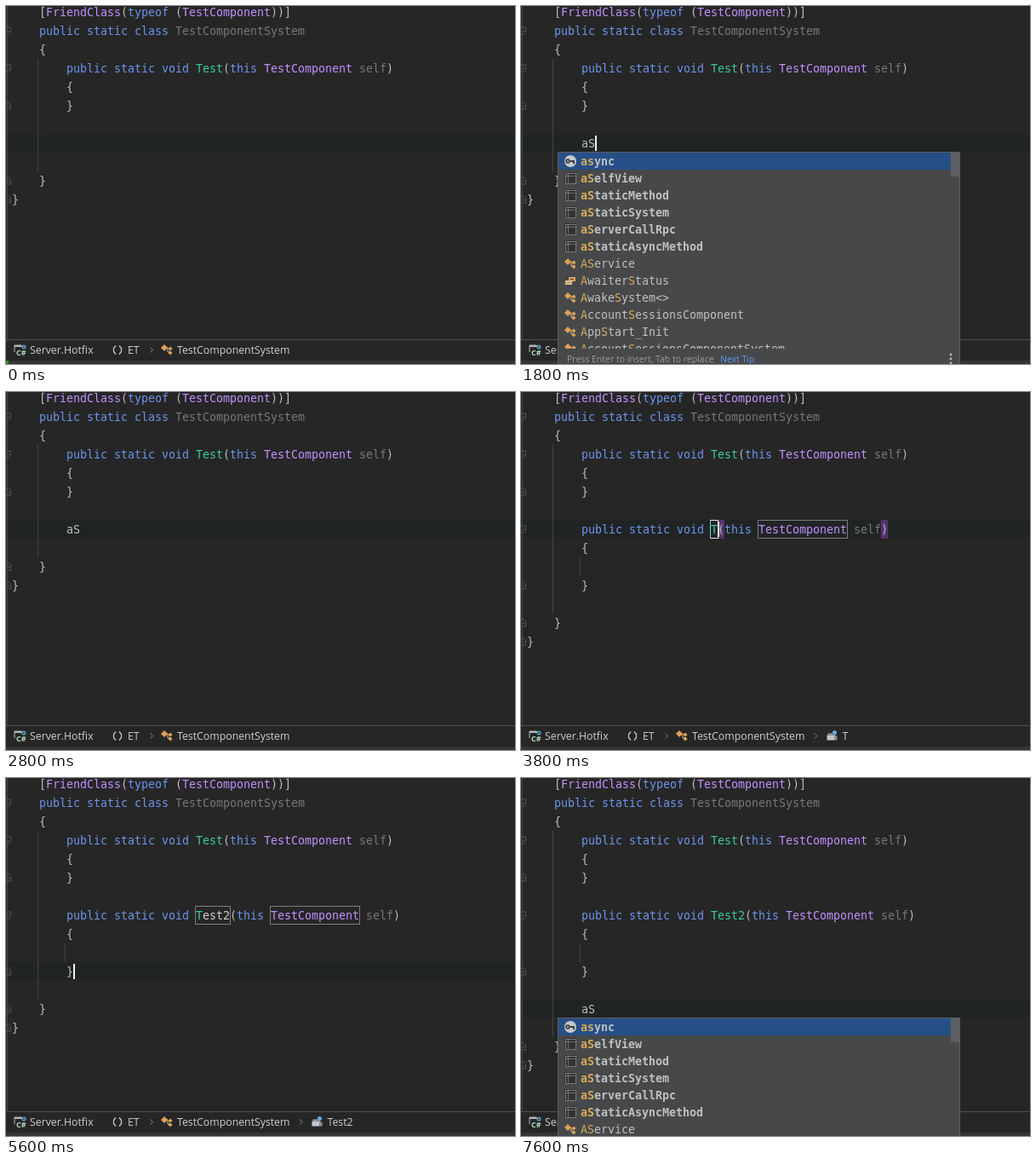
An HTML page with a canvas for the animation above (8 s loop, 598 px wide and 420 px high).

```html
<!DOCTYPE html>
<html lang="en">
<head>
<meta charset="utf-8">
<title>Live template</title>
<style>
html, body { margin: 0; width: 100%; height: 100%; overflow: hidden; background: #262626; }
canvas { display: block; }
</style>
</head>
<body>
<canvas id="stage" width="598" height="420"></canvas>
<script>
const ctx = document.getElementById('stage').getContext('2d');
const LOOP = 8000, ROW = 22, COL = 8, LEFT = 7;
const MONO = '13.3px "DejaVu Sans Mono", monospace';
const UI = '12.3px "Open Sans", sans-serif';
const C = {
  bg: '#262626', line: '#212425', text: '#bdbdbd', key: '#6c95eb', type: '#c191ff',
  fn: '#39cc9b', dim: '#787878', guide: '#434343', ui: '#d0d0d0',
  popup: '#46484a', select: '#274f87', match: '#d6ac5c', orange: '#e0a052', blue: '#6aa7e0'
};
const SUGGEST = [
  ['key', 'async', 1], ['tpl', 'aSelfView', 1], ['tpl', 'aStaticMethod', 1],
  ['tpl', 'aStaticSystem', 1], ['tpl', 'aServerCallRpc', 1], ['tpl', 'aStaticAsyncMethod', 1],
  ['cls', 'AService'], ['enum', 'AwaiterStatus'], ['cls', 'AwakeSystem<>'],
  ['cls', 'AccountSessionsComponent'], ['cls', 'AppStart_Init'],
  ['cls', 'AccountSessionsComponentSystem']
];

// Each step overrides part of the editor state from its time on.
const STEPS = [
  [0, { row: 7, col: 8, caret: false, typed: '', list: false, footer: true, pick: 0, made: false,
        name: '', boxes: false, color: false, crumb: '', param: false, extra: 0, green: true }],
  [600, { caret: true, green: false }],
  [1400, { typed: 'a', col: 9 }],
  [1500, { list: true, footer: false }],
  [1600, { footer: true }],
  [1800, { typed: 'aS', col: 10 }],
  [2300, { pick: 1 }],
  [2400, { pick: 2, caret: false }],
  [2800, { list: false, pick: 0 }],
  [2900, { typed: '', made: true, col: 27, caret: true }],
  [3000, { boxes: true }],
  [3100, { color: true }],
  [3700, { name: 'T', col: 28 }],
  [3800, { crumb: 'T' }],
  [3900, { name: 'Te', col: 29 }],
  [4000, { name: 'Tes', col: 30 }],
  [4100, { name: 'Test', col: 31 }],
  [4400, { param: true }],
  [4600, { name: 'Test2', col: 32 }],
  [5400, { row: 8, col: 9 }],
  [5500, { row: 9, col: 9, param: false }],
  [5600, { row: 10, col: 9, crumb: 'Test2' }],
  [6000, { row: 11, col: 8, extra: 1, boxes: false }],
  [6100, { row: 12, extra: 2 }],
  [6200, { crumb: '' }],
  [6500, { typed: 'a', col: 9 }],
  [6600, { list: true }],
  [6900, { typed: 'aS', col: 10 }],
  [7600, { caret: false }]
];

const stateAt = t => Object.assign({}, ...STEPS.filter(s => s[0] <= t).map(s => s[1]));
const colX = c => LEFT + c * COL;
const rowY = r => r * ROW - 4;

function rect(x, y, w, h, color) {
  ctx.fillStyle = color;
  ctx.fillRect(x, y, w, h);
}

function frame(x, y, w, h, color) {
  ctx.strokeStyle = color;
  ctx.lineWidth = 1;
  ctx.strokeRect(x + .5, y + .5, w - 1, h - 1);
}

function path(points, color, width = 1) {
  ctx.strokeStyle = color;
  ctx.lineWidth = width;
  ctx.beginPath();
  points.forEach(p => ctx.lineTo(p[0], p[1]));
  ctx.stroke();
}

function disc(x, y, r, color) {
  ctx.fillStyle = color;
  ctx.beginPath();
  ctx.arc(x, y, r, 0, 7);
  ctx.fill();
}

function text(str, x, y, color, font) {
  ctx.font = font;
  ctx.fillStyle = color;
  ctx.fillText(str, x, y);
  return x + ctx.measureText(str).width;
}

function code(row, col, ...parts) {
  for (const [str, color] of parts) {
    text(str, colX(col), row * ROW + 12, color, MONO);
    col += str.length;
  }
}

function method(row, name) {
  code(row, 8, ['public static void ', C.key], ...name, ['(', C.text], ['this ', C.key],
    ['TestComponent ', C.type], ['self', C.dim], [')', C.text]);
}

function fold(row, down) {
  const y = row * ROW + 7, d = down ? 1 : -1;
  path([[0, y - 4 * d], [5.5, y - 4 * d], [5.5, y + 2 * d], [2, y + 5 * d], [0, y + 3 * d]], '#545454');
  path([[1, y + .5], [4, y + .5]], '#545454');
}

const ICONS = {
  key(x, y) {
    disc(x, y, 7, '#c4c8ca');
    disc(x - 3, y, 2.8, '#3b3e40');
    disc(x - 3, y, 1, '#c4c8ca');
    rect(x, y - 1, 5, 2, '#3b3e40');
    rect(x + 3, y, 2, 3, '#3b3e40');
  },
  tpl(x, y) {
    rect(x - 7, y - 7, 14, 14, '#303234');
    ctx.setLineDash([1, 1]);
    frame(x - 6, y - 6, 13, 13, '#c2c4c6');
    path([[x - 6, y - 2.5], [x + 6, y - 2.5]], '#a8aaac');
    path([[x - 2.5, y - 6], [x - 2.5, y + 6]], '#a8aaac');
    ctx.setLineDash([]);
  },
  cls(x, y) {
    path([[x - 3, y - 2], [x + 1, y - 2], [x + 1, y + 3], [x + 4, y + 3]], '#c6c6c6');
    for (const [dx, dy, r] of [[-3, -2, 4], [4, -1, 2.6], [4, 4, 2.6]]) {
      ctx.fillStyle = C.orange;
      ctx.beginPath();
      ctx.moveTo(x + dx - r, y + dy);
      ctx.lineTo(x + dx, y + dy - r);
      ctx.lineTo(x + dx + r, y + dy);
      ctx.lineTo(x + dx, y + dy + r);
      ctx.fill();
    }
  },
  enum(x, y) {
    rect(x - 2, y - 4, 8, 5, C.orange);
    rect(x, y - 2, 4, 1, '#4a3c2c');
    rect(x - 6, y, 8, 5, '#c9c9c9');
    rect(x - 5, y + 1, 6, 3, C.orange);
  },
  method(x, y) {
    disc(x + 3, y - 4, 2.5, C.blue);
    path([[x + 3, y - 5], [x + 3, y + 1]], C.blue, 1.5);
    rect(x - 6, y - 1, 9, 6, '#c4c7c9');
    rect(x - 5, y - 3, 6, 2, '#9da1a4');
    rect(x + 3, y, 3, 5, '#8f9497');
  },
  param(x, y) {
    ctx.strokeStyle = C.ui;
    ctx.lineWidth = 1.2;
    for (const a of [0, Math.PI]) {
      ctx.beginPath();
      ctx.arc(x, y, 6.5, a - .8, a + .8);
      ctx.stroke();
    }
    disc(x, y, 2, C.blue);
  },
  space(x, y) {
    for (const d of [-1, 1])
      path([[x + 2 * d, y - 5], [x + 4.5 * d, y - 2], [x + 4.5 * d, y + 2], [x + 2 * d, y + 5]], C.ui, 1.2);
  },
  project(x, y) {
    path([[x - 6, y + 2], [x - 6, y - 6], [x + 2, y - 6]], '#b4b7b9');
    rect(x - 6, y - 6, 9, 2, '#b4b7b9');
    disc(x + 5, y - 4, 2.5, '#5aa7c4');
    disc(x + 5, y - 4, 1, C.bg);
    text('C#', x - 4, y + 6, '#b5d8bd', 'bold 9px "Open Sans", sans-serif');
  }
};

function chevron(x) {
  path([[x - 1.5, 400.5], [x + 1.5, 403.5], [x - 1.5, 406.5]], '#8a8a8a');
}

function crumbs(s) {
  rect(0, 391, 598, 29, C.bg);
  rect(0, 391, 598, 1, '#505050');
  rect(0, 416, 598, 4, '#333536');
  if (s.green) rect(0, 416, 3, 4, '#2f8f2f');
  ICONS.project(16, 404);
  text('Server.Hotfix', 28, 408, C.ui, UI);
  ICONS.space(131, 403.5);
  text('ET', 143, 408, C.ui, UI);
  chevron(171);
  ICONS.cls(189, 403);
  let x = text('TestComponentSystem', 201, 408, C.ui, UI);
  const add = (icon, label) => {
    chevron(x + 13);
    ICONS[icon](x + 32, 403.5);
    x = text(label, x + 44, 408, C.ui, UI);
  };
  if (s.crumb) add('method', s.crumb);
  if (s.param) add('param', 'self');
}

function suggestion([icon, label, bold], y, query) {
  ICONS[icon](58, y + 10);
  const font = (bold ? 'bold ' : '') + MONO;
  const second = query.length < 2 ? -1
    : label === 'async' ? 1 : label.indexOf('S');
  [...label].forEach((ch, i) =>
    text(ch, 70 + i * COL, y + 15, i === 0 || i === second ? C.match : '#bfc1c3', font));
}

function popup(s) {
  const top = rowY(s.row) + ROW - 1;
  rect(43, top, 473, 249, C.popup);
  ctx.save();
  ctx.beginPath();
  ctx.rect(43, top, 473, 231);
  ctx.clip();
  rect(44, top + 1 + s.pick * 20, 471, 20, C.select);
  rect(505, top + 1, 10, 28, '#5d6063');
  SUGGEST.forEach((item, i) => suggestion(item, top + 1 + i * 20, s.typed));
  ctx.restore();
  frame(43, top, 473, 260, '#5c5e60');
  if (!s.footer) return;
  const font = '10.5px "Open Sans", sans-serif';
  text('Press Enter to insert, Tab to replace', 54, top + 247, '#9a9c9e', font);
  text('Next Tip', 234, top + 247, '#589df6', font);
  for (const dy of [238, 243, 248]) disc(505, top + dy, 1.4, '#b4b6b8');
}

function templateMethod(s) {
  const open = 27 + s.name.length, top = rowY(7);
  const typing = s.boxes && s.row === 7;
  if (typing && s.color) {
    rect(colX(open), top, COL, ROW, '#54336d');
    rect(colX(open + 24), top, COL, ROW, '#54336d');
  }
  const done = !s.boxes;
  method(7, done ? [[s.name, C.fn]] : [[s.name.slice(0, 1), C.fn], [s.name.slice(1), '#d0d0d0']]);
  code(8, 8, ['{', C.text]);
  code(10, 8, ['}', C.text]);
  rect(69, rowY(9), 1, ROW, C.guide);
  if (s.boxes) {
    frame(222, top, s.name.length * COL + 2, ROW, typing ? '#e4e4e4' : '#808080');
    if (typing) rect(222, top, 1, ROW, '#7fd0e8');
    frame(colX(open + 6) - 1, top, 13 * COL + 2, ROW, '#7c7c7c');
  }
  fold(7, true);
  fold(10, false);
}

function draw(t) {
  const s = stateAt(t);
  const end = (s.made ? 12 : 9) + s.extra;
  rect(0, 0, 598, 420, C.bg);
  rect(0, rowY(s.row), 598, ROW, C.line);
  rect(1, 0, 1, 391, '#454545');
  rect(37, rowY(3), 1, rowY(end) - rowY(3), C.guide);

  code(0, 4, ['[', C.text], ['FriendClass', C.type], ['(', C.text], ['typeof ', C.key],
    ['(', C.text], ['TestComponent', C.type], ['))]', C.text]);
  code(1, 4, ['public static class ', C.key], ['TestComponentSystem', C.dim]);
  code(2, 4, ['{', C.text]);
  method(3, [['Test', C.fn]]);
  code(4, 8, ['{', C.text]);
  code(5, 8, ['}', C.text]);
  code(end, 4, ['}', C.text]);
  code(end + 1, 0, ['}', C.text]);
  fold(1, true);
  fold(3, true);
  for (const r of [5, end, end + 1]) fold(r, false);

  if (s.made) templateMethod(s);
  code(s.row, 8, [s.typed, C.text]);
  if (s.caret) rect(colX(s.col), rowY(s.row) + 2, 2, 18, '#f0f0f0');
  crumbs(s);
  if (s.list) popup(s);
}

const start = performance.now();
function tick() {
  draw((performance.now() - start) % LOOP);
  requestAnimationFrame(tick);
}
tick();
</script>
</body>
</html>
```
